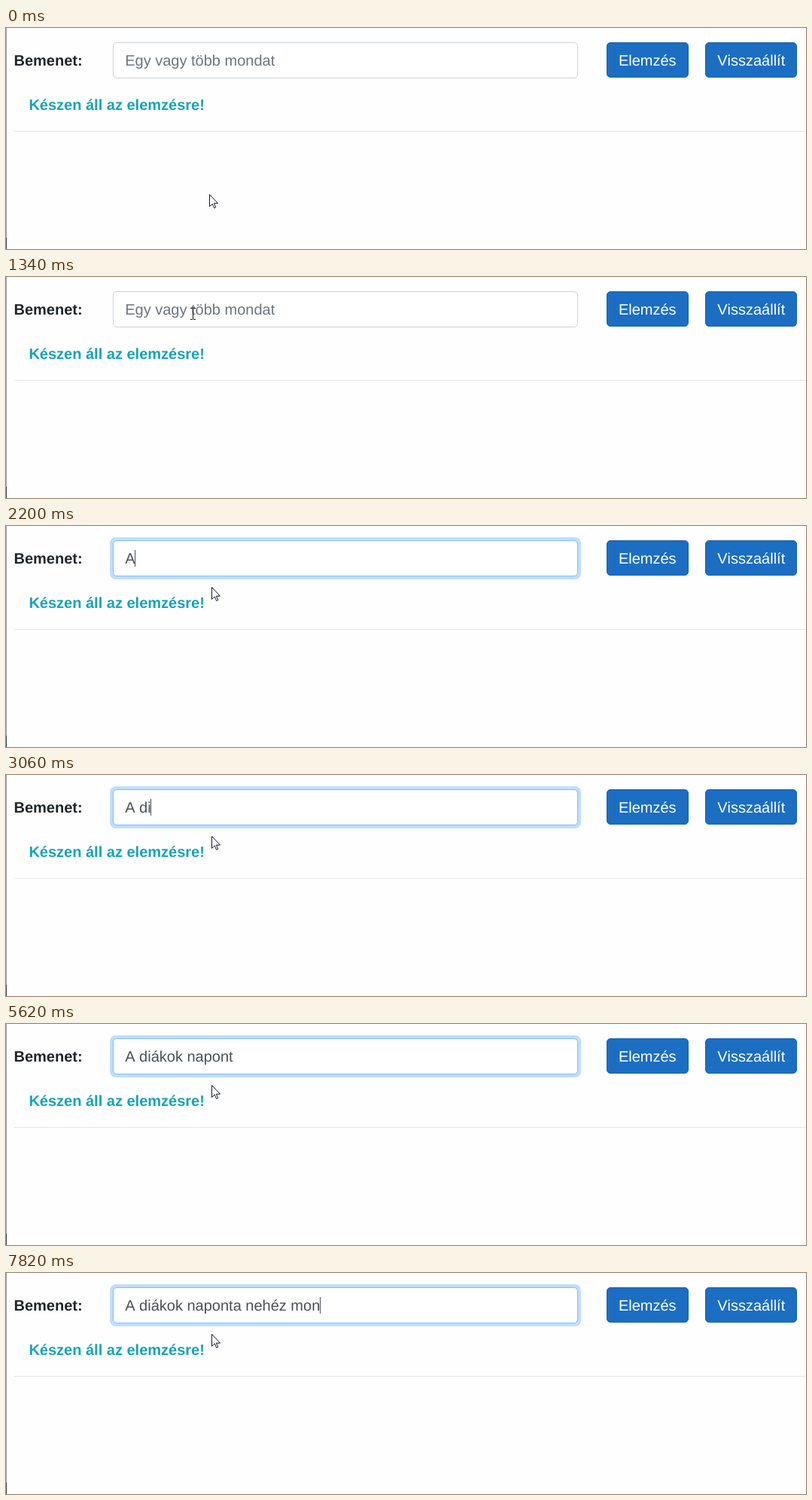
Animation of 1063 by 294 pixels, one loop 8000 ms. Source, as an HTML page:

```html
<!DOCTYPE html>
<html lang="hu">
<head>
<meta charset="utf-8">
<title>Bemenet</title>
<style>
  html, body { margin: 0; width: 100%; height: 100%; overflow: hidden; background: #fefefe; }
  svg { display: block; }
  text {
    font: 20px "Liberation Sans", Arial, sans-serif;
    font-kerning: none;
    text-rendering: geometricPrecision;
    white-space: pre;
  }
  .bold { font-weight: bold; }
  .button rect { fill: #1b6ec2; stroke: #1861ac; }
  .button text { fill: #fff; }
</style>
</head>
<body>
<svg width="1063" height="294" viewBox="0 0 1063 294">
  <rect width="1" height="279" fill="#a0a0a0"/>
  <rect y="279" width="1" height="15" fill="#404040"/>
  <text class="bold" x="10.5" y="50" fill="#212529">Bemenet:</text>

  <rect id="ring" x="138" y="15" width="626" height="56" rx="8" fill="#bfdeff"/>
  <rect id="field" x="142.5" y="19.5" width="617" height="47" rx="4.5" fill="#fff"/>
  <text id="placeholder" x="158.2" y="50" fill="#6c757d">Egy vagy több mondat</text>
  <text id="typed" x="158.2" y="50" fill="#495057"></text>
  <rect id="caret" y="32" width="1" height="22" fill="#495057"/>

  <g class="button">
    <rect x="798.5" y="19.5" width="108" height="46" rx="4.5"/>
    <text x="813.9" y="50">Elemzés</text>
  </g>
  <g class="button">
    <rect x="929.5" y="19.5" width="121" height="46" rx="4.5"/>
    <text x="945.2" y="50">Visszaállít</text>
  </g>

  <text class="bold" x="30.4" y="109" fill="#17a2b8">Készen áll az elemzésre!</text>
  <rect x="11" y="137" width="1052" height="1" fill="#e5e5e5"/>

  <path id="arrow" d="M.5.5V16.5L4.2 13 6.7 18.5 8.8 17.6 6.4 12.2H11.5Z" fill="#fff" stroke="#111827"/>
  <path id="beam" d="M-3-7.5H0M1-7.5H4M.5-7V7M-3 7.5H0M1 7.5H4" fill="none" stroke="#111"/>
</svg>
<script>
const LOOP = 8000;
const TEXT_X = 158.2;
const SENTENCE = "A diákok naponta nehéz mon";
const FOCUS_START = 1460, FOCUS_END = 1580;

// One time per typed character, and the times the caret blinks off.
const keyTimes = [2200, 2690, 2940, 3060, 3680, 3920, 4040, 4160, 4520, 4650, 4770, 5130, 5250,
  5370, 5620, 5860, 6190, 6300, 6520, 6630, 7000, 7120, 7350, 7580, 7700, 7820];
const blinkTimes = [1950, 2450, 3560, 4400, 5010, 5620, 6070, 6410, 7120];

// Pointer positions: time, x, y, shape
const pointerSteps = [
  [0, 270, 221, "arrow"], [120, 258, 213, "arrow"], [250, 247, 208, "arrow"],
  [490, 266, 237, "arrow"], [610, 303, 270, "arrow"], [730, 326, 276, "arrow"],
  [840, 315, 222, "arrow"], [960, 282, 158, "arrow"], [1080, 249, 113, "arrow"],
  [1190, 247, 54, "beam"], [1340, 248, 49, "beam"], [1460, 249, 51, "beam"],
  [1580, 273, 81, "arrow"]
];

const el = id => document.getElementById(id);
const show = (id, visible) => el(id).setAttribute("visibility", visible ? "visible" : "hidden");
const lastBefore = (times, t) => Math.max(FOCUS_START, ...times.filter(time => time <= t));

function drawPointer(t) {
  const [, x, y, shape] = pointerSteps.findLast(step => step[0] <= t);
  for (const id of ["arrow", "beam"]) show(id, id === shape);
  el(shape).setAttribute("transform", `translate(${x} ${y})`);
}

function drawField(t) {
  const focused = t >= FOCUS_START;
  el("ring").setAttribute("opacity", t >= FOCUS_END ? 1 : focused ? 0.5 : 0);
  el("field").setAttribute("stroke", t >= FOCUS_END ? "#80bdff" : focused ? "#a7c9ed" : "#ced4da");

  const count = keyTimes.filter(time => time <= t).length;
  const typed = el("typed");
  typed.textContent = SENTENCE.slice(0, count);
  show("placeholder", count === 0);

  const width = count ? typed.getComputedTextLength() : 0;
  el("caret").setAttribute("x", Math.floor(TEXT_X + width));
  const blinkedOff = blinkTimes.some(time => time <= t) &&
    lastBefore(blinkTimes, t) >= lastBefore(keyTimes, t);
  show("caret", focused && !blinkedOff);
}

const start = performance.now();
function draw() {
  const t = (performance.now() - start) % LOOP;
  drawPointer(t);
  drawField(t);
  requestAnimationFrame(draw);
}
draw();
</script>
</body>
</html>
```
